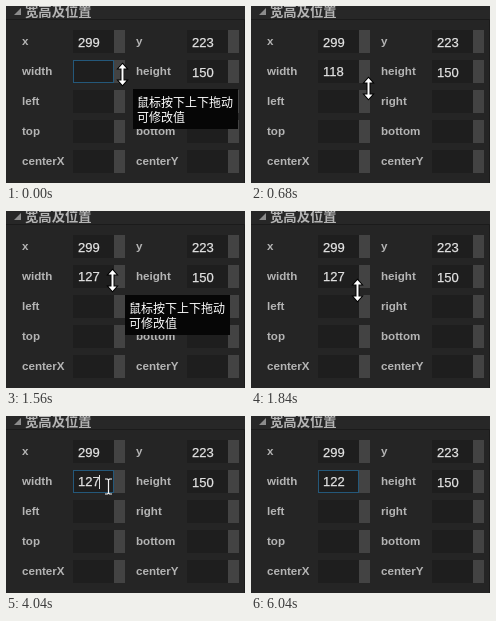
These frames come from a looping animation (239x177 px, 6.6 s). An HTML page:

```html
<!DOCTYPE html>
<html lang="zh">
<head>
<meta charset="utf-8">
<style>
  html, body { margin: 0; width: 100%; height: 100%; overflow: hidden; background: #252525; }
  svg { display: block; width: 239px; height: 177px; }
  text { font-family: "Liberation Sans", Arial, sans-serif; }
  .label { font-size: 11.6px; font-weight: bold; fill: #b4b4b4; }
  .value { font-size: 13px; fill: #e2e2e2; stroke: #e2e2e2; stroke-width: .25px; }
  .cjk { font-family: "Noto Sans CJK SC", "Noto Sans CJK", sans-serif; font-size: 12px; fill: #fff; }
  .title { font-size: 13.333px; font-weight: bold; fill: #b4b4b4; }
  .outlined { fill: #fff; stroke: #000; stroke-width: 2px; paint-order: stroke; }
</style>
</head>
<body>
<svg viewBox="0 0 239 177">
  <rect width="239" height="13" fill="#272727"/>
  <path d="M0 13.5H238.5V177" fill="none" stroke="#1b1b1b"/>
  <path d="M8 9H15V2Z" fill="#8c8c8c"/>
  <text class="cjk title" x="19" y="10">宽高及位置</text>
  <g id="rows"></g>
  <rect id="focus" x="67.5" y="54.5" width="40" height="22" fill="none" stroke="#24587a"/>
  <rect id="selection" x="72" y="59" width="21" height="14" fill="#3297fd"/>
  <text id="width" class="value" x="72" y="70"></text>
  <rect id="caret" x="93" y="59" width="1" height="14" fill="#dedede"/>
  <g id="tip">
    <rect width="105" height="40" fill="#060606"/>
    <text class="cjk" x="4" y="18">鼠标按下上下拖动</text>
    <text class="cjk" x="4" y="33">可修改值</text>
  </g>
  <g id="cursor">
    <path id="resize" class="outlined" d="M0-10.5 4-6H1V6H4L0 10.5-4 6H-1V-6H-4Z"/>
    <path id="beam" d="M-3.5-7.5H-1L0-6.5 1-7.5H3.5M0-6.5V6.5M-3.5 7.5H-1L0 6.5 1 7.5H3.5" fill="none" stroke="#f4f4f4" stroke-width="1.2"/>
    <path id="arrow" class="outlined" d="M0 0V16L4 12.5 6.5 18.5 9 17.5 6.5 11.5H11.5Z"/>
  </g>
</svg>
<script>
const LOOP = 6600, TICK = 40, TIP_MAX_X = 127;
const $ = id => document.getElementById(id);

const rows = [['x', 'y', 299, 223], ['width', 'height', '', 150],
  ['left', 'right', '', ''], ['top', 'bottom', '', ''], ['centerX', 'centerY', '', '']];

const field = (label, value, x, y) => `
  <text class="label" x="${x}" y="${y + 15}">${label}</text>
  <rect x="${x + 51}" y="${y}" width="41" height="23" fill="#1e1e1e"/>
  <rect x="${x + 92}" y="${y}" width="11" height="23" fill="#434343"/>
  <text class="value" x="${x + 56}" y="${y + 17}">${value}</text>`;

$('rows').innerHTML = rows.map(([a, b, va, vb], i) =>
  field(a, va, 16, 24 + 30 * i) + field(b, vb, 130, 24 + 30 * i)).join('');

// Dragging: time, pointer x, pointer y, value
const drag = [[0, 116, 68, 132], [240, 116, 68, 132], [480, 117, 73.5, 127], [680, 117, 82, 118],
  [1000, 117, 82, 118], [1240, 115, 68, 128], [1280, 115, 68, 128], [1400, 113, 67, 127],
  [1560, 106, 69, 127]];

// Pointer jumps after the drag: time, x, y, shape
const jumps = [[1800, 106, 79, 'resize'], [1880, 102, 72, 'beam'], [2160, 102, 70, 'beam'],
  [5600, 116, 104, 'arrow'], [5640, 134, 156, 'arrow'], [5680, 0, 0, '']];

// Arrow keys: three up, then eight down
const ups = [3160, 3400, 3560];
const downs = [3760, 3880, 4040, 4160, 4320, 4400, 4760, 4880];

const during = (t, ...spans) => spans.some(([a, b]) => t >= a && t < b);
const passed = (t, times) => times.filter(k => t >= k).length;
const show = (id, on) => $(id).setAttribute('visibility', on ? 'visible' : 'hidden');
const move = (id, x, y) => $(id).setAttribute('transform', `translate(${x} ${y})`);

function dragAt(t) {
  const i = drag.findIndex(k => k[0] > t);
  if (i < 0) return drag[drag.length - 1].slice(1);
  const a = drag[i - 1], b = drag[i], p = (t - a[0]) / (b[0] - a[0]);
  return [1, 2, 3].map(n => Math.round(a[n] + (b[n] - a[n]) * p));
}

function draw(t) {
  let [x, y, value] = dragAt(t), shape = 'resize';
  for (const [start, ...state] of jumps) if (t >= start) [x, y, shape] = state;
  value += passed(t, ups) - passed(t, downs);

  $('width').textContent = t < 40 ? '' : value;
  show('focus', t < 40 || t >= 1920);
  show('selection', during(t, [1920, 2320], [3160, 3760]));
  show('caret', during(t, [2320, 2720], [3760, 5280], [5680, 6040]));
  show('tip', during(t, [0, 40], [1400, 1680]));
  move('tip', Math.min(x + 13, TIP_MAX_X), y + 15);
  move('cursor', x + .5, y + .5);
  for (const id of ['resize', 'beam', 'arrow']) show(id, id === shape);
}

let begin;
function frame(now) {
  begin ??= now;
  const t = (now - begin) % LOOP;
  draw(Math.floor(t / TICK + 1e-6) * TICK);
  requestAnimationFrame(frame);
}
draw(0);
requestAnimationFrame(frame);
</script>
</body>
</html>
```
